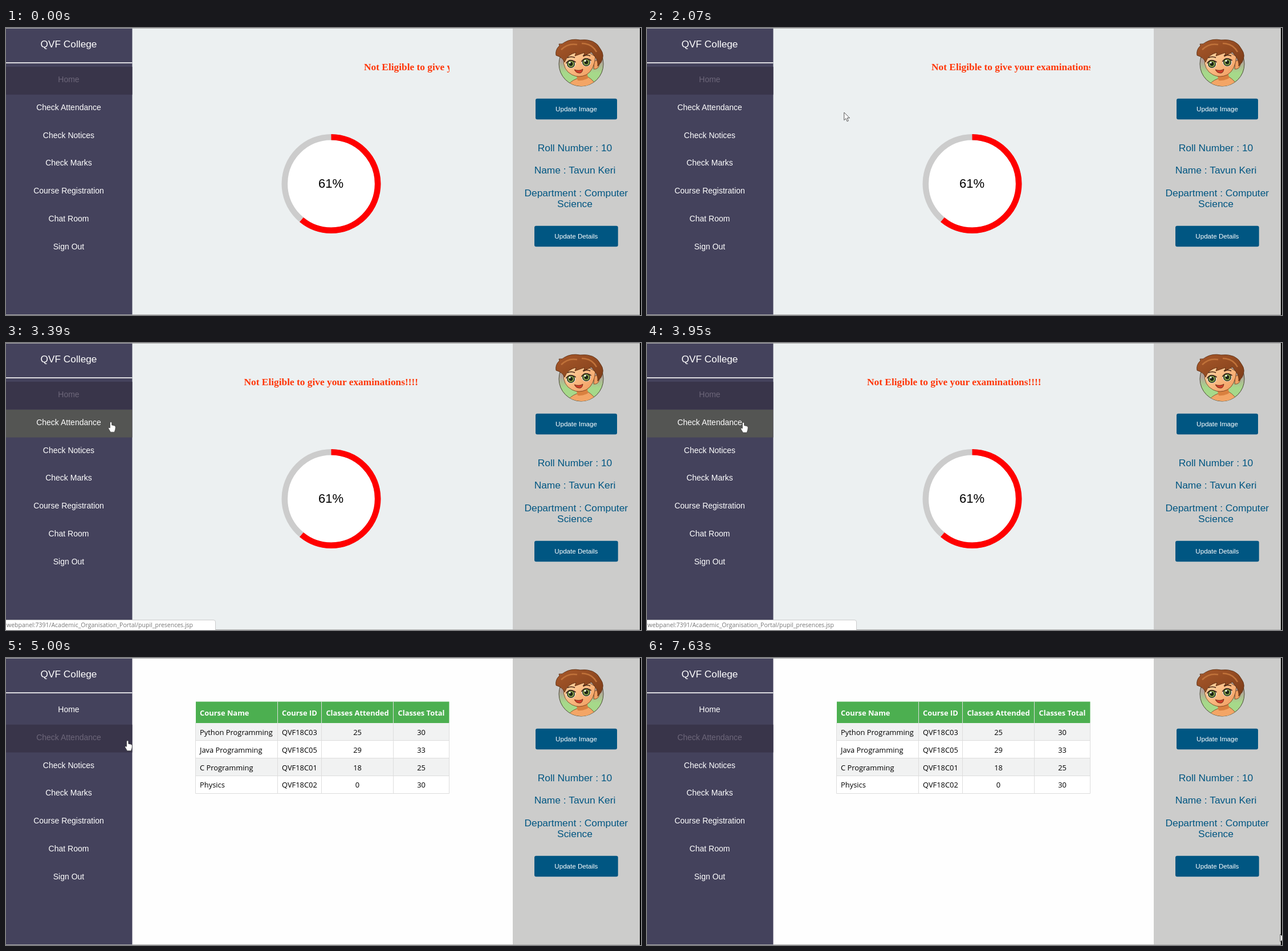
Recreate the animation shown at these times as an HTML page. Size 1114 by 503 pixels, loop 7.7 s.

```html
<!DOCTYPE html>
<html lang="en">
<head>
<meta charset="utf-8">
<title>Student portal</title>
<style>
html, body { margin: 0; width: 100%; height: 100%; overflow: hidden; }
svg { display: block; width: 1114px; height: 503px; }
text { font-family: "Liberation Sans", Arial, sans-serif; text-anchor: middle; white-space: pre; }
.open, #table text { font-family: "Open Sans", sans-serif; }
.start { text-anchor: start; }
#notice { font: bold 17.35px "Liberation Serif", serif; }
</style>
</head>
<body>
<svg viewBox="0 0 1114 503">
  <defs>
    <clipPath id="lane"><rect x="333" y="50" width="445" height="40"/></clipPath>
    <clipPath id="disc"><circle cx="1009" cy="63" r="39"/></clipPath>
    <linearGradient id="sky" x2="0" y2="1">
      <stop offset=".45" stop-color="#b3a49c"/><stop offset=".7" stop-color="#a6d98a"/>
    </linearGradient>
    <linearGradient id="hair" x2="1" y2="1">
      <stop stop-color="#a9592a"/><stop offset="1" stop-color="#7c3c19"/>
    </linearGradient>
    <linearGradient id="skin" x2="1" y2="1">
      <stop offset=".3" stop-color="#fdc792"/><stop offset="1" stop-color="#f0985a"/>
    </linearGradient>
  </defs>
  <rect id="main" width="1114" height="503"/>

  <g id="home">
    <g clip-path="url(#lane)"><text id="notice" class="start" y="74" fill="#ff3608">Not Eligible to give your examinations!!!!</text></g>
    <circle cx="570.5" cy="273" r="81.7" fill="#fff" stroke="#ccc" stroke-width="10.6"/>
    <circle cx="570.5" cy="273" r="81.7" fill="none" stroke="#f00" stroke-width="10.6"
      pathLength="100" stroke-dasharray="61 39" transform="rotate(-90 570.5 273)"/>
    <text x="570" y="280" font-size="22">61%</text>
  </g>
  <g id="table"></g>

  <rect width="221.5" height="503" fill="#44425c"/>
  <rect y="60.2" width="221.5" height="1.6" fill="#fff"/>
  <text x="110" y="33.5" font-size="17.3" fill="#fff">QVF College</text>
  <g id="menu"></g>

  <rect x="889" width="223" height="503" fill="#cccccb"/>
  <g id="avatar">
    <circle cx="1009" cy="63" r="39" fill="url(#sky)" stroke="#4b4a35"/>
    <g clip-path="url(#disc)">
      <path d="M984 103Q990 93 1001 89L1020 85Q1032 92 1036 103Z" fill="#f3a566" stroke="#6b4a2a" stroke-width=".8"/>
      <path d="M1001 85L1020 81L1021 88Q1012 93 1003 92Z" fill="#d9803f"/>
    </g>
    <path d="M1032 58Q1042 54 1041 64Q1039 73 1031 72Z" fill="#f0a063" stroke="#6d3a1c" stroke-width=".8"/>
    <path d="M978 53Q977 74 993 82Q1005 88 1018 82Q1032 74 1034 50L1010 36Z" fill="url(#skin)" stroke="#6d3a1c" stroke-width=".8"/>
    <path d="M965 48Q963 38 971 31L970 28Q976 29 980 25Q992 18 1007 21Q1034 18 1043 37Q1051 48 1044 60L1038 67Q1039 57 1033 50L1027 42L1013 50L1015 43L998 49L1000 43Q985 46 980 60Q976 51 965 48Z" fill="url(#hair)" stroke="#54290f" stroke-width=".8"/>
    <path d="M974 38Q986 26 1002 29M1010 27Q1028 27 1036 42" fill="none" stroke="#c0723a" stroke-width="2.5"/>
    <g id="eyes"></g>
    <path d="M997 73Q1006 76 1012 72Q1011 80 1005 79Q1000 79 997 73Z" fill="#cf3f28" stroke="#5a2415" stroke-width=".8"/>
  </g>
  <g id="details"></g>
  <path d="M0 .5H1112M0 502.5H1112" stroke="#ababab"/>
  <rect x="1112" width="2" height="503"/>

  <g id="status">
    <path d="M-1 504V485.5H364Q367.5 485.5 367.5 489V504Z" fill="#fff" stroke="#ccc"/>
    <text class="open start" x="1" y="498" font-size="10.5" fill="#777">webpanel:7391/Academic_Organisation_Portal/pupil_presences.jsp</text>
  </g>
  <path id="arrow" d="M0 0V13.5L3.1 10.6L5.3 15.6L7.5 14.7L5.3 9.7H9.7Z" fill="#fff" stroke="#444" stroke-width=".9"/>
  <path id="hand" d="M-1.6 1.2Q0 -1 1.6 1.2V5.6L6 6.5Q8.3 7 8.2 9.5L7.8 13L6.2 18H-.6L-4.3 11.8Q-5 9 -1.6 10.6Z" fill="#fff" stroke="#333" stroke-width=".7"/>
</svg>
<script>
const $ = id => document.getElementById(id);
const show = (el, on) => el.setAttribute("display", on ? "inline" : "none");
const rect = (x, y, w, h, fill, more = "") =>
  `<rect x="${x}" y="${y}" width="${w}" height="${h}" fill="${fill}" ${more}/>`;
const text = (x, y, size, fill, s, more = "") =>
  `<text x="${x}" y="${y}" font-size="${size}" fill="${fill}" ${more}>${s}</text>`;

// Sidebar
const PITCH = 48.75;
$("menu").innerHTML = ["Home", "Check Attendance", "Check Notices", "Check Marks",
  "Course Registration", "Chat Room", "Sign Out"].map((s, i) =>
  "<g>" + rect(0, 68 + i * PITCH, 221.5, PITCH, "none") +
  text(110, 95 + i * PITCH, 14, "#fff", s) + "</g>").join("");
const items = [...$("menu").children];

// Profile panel
const BLUE = "#005682";
const button = (x, y, w, s) => rect(x, y, w, 36.4, BLUE, 'rx="3"') +
  text(x + w / 2, y + 22.2, 11.6, "#fff", s);
$("details").innerHTML = button(929, 123.8, 143, "Update Image") + button(927, 346.8, 146.7, "Update Details") +
  [["Roll Number : 10", 998, 215.7], ["Name : Tavun Keri", 998, 255.2],
    ["Department : Computer", 1000.3, 294.7], ["Science", 998, 314.3]]
    .map(([s, x, y]) => text(x, y, 17.4, BLUE, s)).join("");
$("eyes").innerHTML = [[991, 63], [1018, 60]].map(([x, y]) =>
  `<g transform="translate(${x} ${y})"><ellipse rx="8" ry="7.5" fill="#fff"/>
  <circle r="6.3" fill="#8aa54e" stroke="#26301a" stroke-width="1.5"/><circle r="3.4" fill="#1d2415"/>
  <circle cx="-2" cy="-2.5" r="1.6" fill="#fff"/>
  <path d="M-8.5 -1Q-2 -11 8.5 -3M-6 -11Q1 -14 7 -11" fill="none" stroke="#3b2012" stroke-width="1.6"/></g>`).join("");

// Attendance table
const COLS = [332.5, 476.5, 553.5, 679.5, 777.5], TOP = 113.5, ROW = 30.9;
const rowY = i => Math.floor(TOP + i * ROW) + .5;
const cells = (row, y, fill, more) => row.map((s, i) => i < 2
  ? text(COLS[i] + 7.5, y, 12.9, fill, s, 'class="start" ' + more)
  : text((COLS[i] + COLS[i + 1]) / 2, y, 12.9, fill, s, more)).join("");
const data = [["Python Programming", "QVF18C03", 25, 30], ["Java Programming", "QVF18C05", 29, 33],
  ["C Programming", "QVF18C01", 18, 25], ["Physics", "QVF18C02", 0, 30]];
const grid = COLS.map((x, i) => `M${x} ${i % 4 ? 76.5 : TOP}V${rowY(4)}`).join("") +
  [1, 2, 3, 4].map(i => `M332.5 ${rowY(i)}H777.5`).join("");
$("table").innerHTML = data.map((_, i) => rect(332.5, rowY(i), 445, ROW, "#fff")).join("") +
  rect(333, 76.5, 444.5, 37.5, "#4caf50") + `<path d="${grid}" fill="none" stroke="#ddd"/>` +
  cells(["Course Name", "Course ID", "Classes Attended", "Classes Total"], 100.5, "#fff", 'font-weight="bold"') +
  data.map((row, i) => cells(row, 135 + i * 30.8, "#000", "")).join("");
const rows = [...$("table").children].slice(0, 4);

// Piecewise linear motion: each key is [position, ...values]
function along(keys, p) {
  let i = 1;
  while (i < keys.length - 1 && p > keys[i][0]) i++;
  const a = keys[i - 1], b = keys[i];
  const f = Math.min(1, Math.max(0, (p - a[0]) / (b[0] - a[0])));
  return a.slice(1).map((v, j) => v + (b[j + 1] - v) * f);
}
const pointer = [[70, 992, 499], [820, 625, 248], [980, 542, 201.5], [1670, 416, 157], [2070, 346, 148],
  [2450, 266, 147], [2910, 197, 137.5], [3950, 169, 139], [4540, 169, 139], [5000, 212.5, 144.5],
  [5310, 440, 188], [6090, 640, 230], [6930, 876, 389], [7630, 1111, 484]];
const notice = [[0, 628], [13, 565.5], [27, 499], [38, 444.5], [51, 386], [52, 381]];
const LOOP = 7700, SWITCH = 4010;

function draw(t) {
  const home = t < SWITCH;
  const [x, y] = along(pointer, t);
  const onMenu = x < 221;
  show($("home"), home);
  show($("table"), !home);
  $("main").setAttribute("fill", home ? "#ecf0f1" : "#fefefe");

  // The notice scrolls in discrete ticks
  $("notice").setAttribute("x", along(notice, Math.floor(t / 76.6 + .3))[0]);

  items.forEach((item, i) => {
    const active = i === (home ? 0 : 1);
    const hover = onMenu && Math.floor((y - 68) / PITCH) === i;
    item.children[0].setAttribute("fill", active ? "#39354a" : hover ? "#545553" : "none");
    item.children[1].setAttribute("fill", active ? "#6d677a" : "#fff");
  });
  const over = x > 333 && x < 777 ? Math.floor((y - TOP) / ROW) : -1;
  rows.forEach((r, i) => r.setAttribute("fill", i === over ? "#ddd" : i % 2 ? "#fff" : "#f1f2f2"));

  const fade = t < 4230 ? 1 : t < 4310 ? .66 : t < 4390 ? .33 : 0;
  $("status").setAttribute("opacity", t < 3330 ? 0 : fade);

  show($("arrow"), t >= 70 && !onMenu);
  show($("hand"), onMenu);
  for (const id of ["arrow", "hand"]) $(id).setAttribute("transform", `translate(${x} ${y})`);
}

const start = performance.now();
function tick() {
  draw((performance.now() - start) % LOOP);
  requestAnimationFrame(tick);
}
tick();
</script>
</body>
</html>
```
